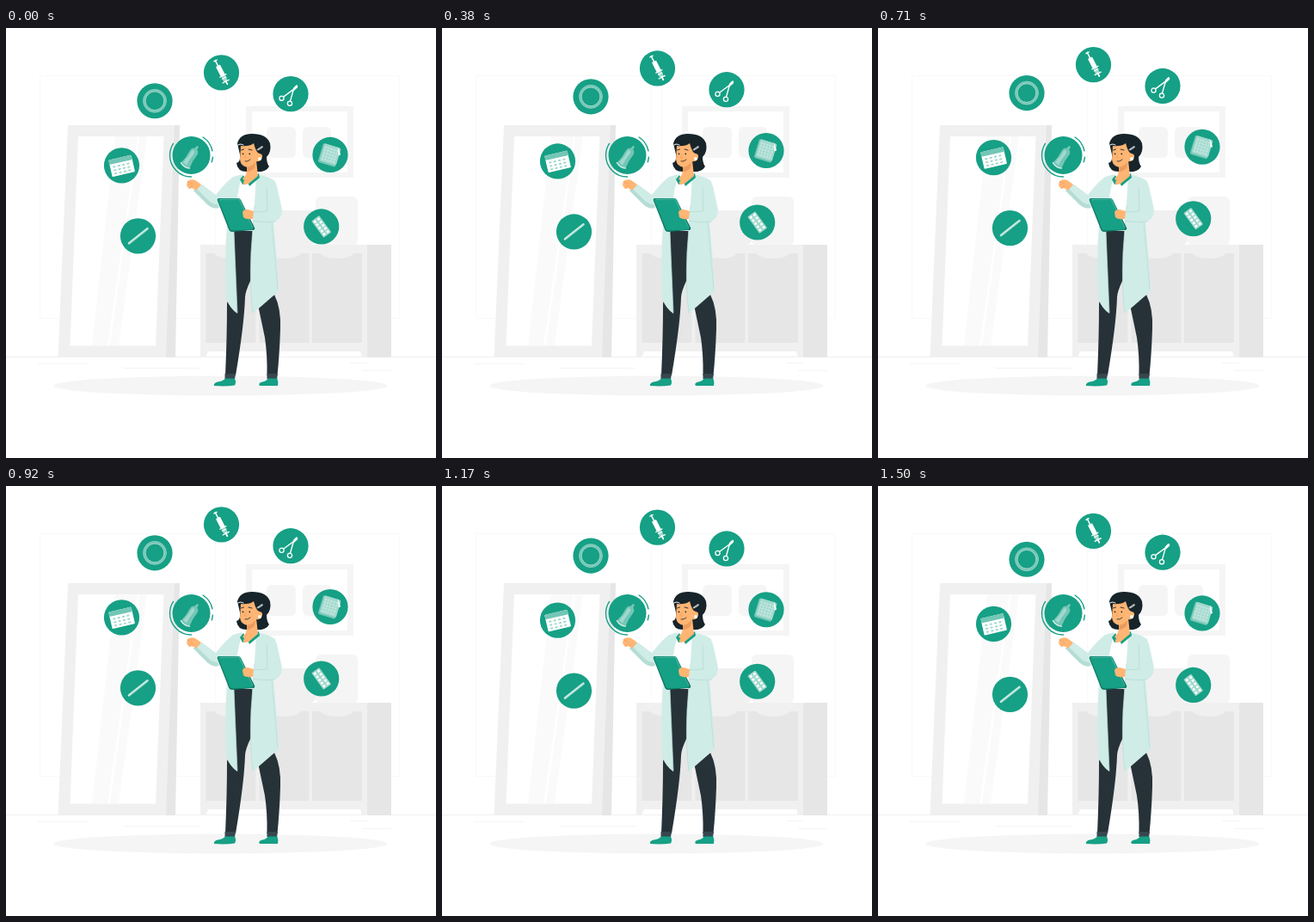
These frames come from a looping animation (500 by 500 pixels, 1540 ms). An HTML page with a canvas:

```html
<!DOCTYPE html>
<html lang="en">
<head>
<meta charset="utf-8">
<title>Floating icons</title>
<style>
  html, body { margin: 0; width: 100%; height: 100%; overflow: hidden; background: #fff; }
  canvas { display: block; width: 500px; height: 500px; }
</style>
</head>
<body>
<canvas id="stage" width="500" height="500"></canvas>
<script>
const ctx = document.getElementById('stage').getContext('2d');
const LOOP = 1540, RISE = 10, LEAD = LOOP / 37;
const GREEN = '#16a085', MINT = '#d0ece7', PALE = '#a2d9ce', SHADE = '#b5ddd5';
const DARK = '#263238', HAIR = '#17242a', SKIN = '#ffb573';

const fill = (d, color) => { ctx.fillStyle = color; ctx.fill(new Path2D(d)); };
const line = (d, color, width = 1) => {
  ctx.strokeStyle = color;
  ctx.lineWidth = width;
  ctx.stroke(new Path2D(d));
};
const box = (x, y, w, h, color, r = 0) => {
  ctx.fillStyle = color;
  ctx.beginPath();
  ctx.roundRect(x, y, w, h, r);
  ctx.fill();
};
const disc = (x, y, r, color) => {
  ctx.fillStyle = color;
  ctx.beginPath();
  ctx.arc(x, y, r, 0, Math.PI * 2);
  ctx.fill();
};
const arc = (x, y, r, from, to, color, width) => {
  ctx.strokeStyle = color;
  ctx.lineWidth = width;
  ctx.beginPath();
  ctx.arc(x, y, r, from * Math.PI / 180, to * Math.PI / 180);
  ctx.stroke();
};
const placed = (x, y, degrees, draw) => {
  ctx.save();
  ctx.translate(x, y);
  ctx.rotate(degrees * Math.PI / 180);
  draw();
  ctx.restore();
};

function drawRoom() {
  line('M39.5 55.5H243.5V337.5H39.5ZM255.5 55.5H457.5V337.5H255.5Z', '#f9f9f9');
  line('M0 382.5H500', '#f0f0f0');
  line('M37 390.5H96M136 395.5H225M400 389.5H420M414 398.5H448', '#f5f5f5');

  fill('M279 91H404V174H279ZM286 97V168H397V97Z', '#f5f5f5');
  box(303, 115, 34, 36, '#f5f5f5', 6);
  box(345, 115, 33, 36, '#f5f5f5', 6);

  box(360, 196, 49, 57, '#f5f5f5', 6);
  box(303, 212, 57, 40, '#f0f0f0', 6);
  fill('M226 252H420V383H414L412 376H235L232 383H226Z', '#f0f0f0');
  box(420, 252, 28, 131, '#e6e6e6');
  for (const x of [232.5, 294.5, 356]) {
    box(x, 262, 58, 104, '#e6e6e6');
    fill(`M${x + 9} 262H${x + 49}Q${x + 43} 268 ${x + 29} 268Q${x + 15} 268 ${x + 9} 262Z`, '#f0f0f0');
  }

  fill('M194 113H202L197 383H185Z', '#e6e6e6');
  fill('M72 113H196L186 383H60.5Z', '#f0f0f0');
  fill('M84 126H183.5L174 369.5H74.5Z', '#fff');
  fill('M127 126H153L118 369H100ZM155 126H164L131 369H121Z', '#fafafa');

  ctx.fillStyle = '#f5f5f5';
  ctx.beginPath();
  ctx.ellipse(249.5, 416, 194, 11.5, 0, 0, Math.PI * 2);
  ctx.fill();
}

function drawLegs() {
  fill('M265 234H287L285 292Q278 307 278 313Q277 345 267 404H255Q257 360 257 320L266 300Z', DARK);
  fill('M293 322L312 310Q320 326 319 350Q318 380 315.5 404H303.5Q304 380 301 360Z', DARK);
  fill('M254.5 402H267L266 408H254.5ZM303.5 402H316L315 408H303.5Z', '#37474f');
  fill('M255 407.5H266Q268 412 266 415.5Q255 417 242 416Q241 413 246 411.5Q252 411 255 407.5Z', GREEN);
  fill('M304.5 407.5H315.5Q317 412 316 416H295Q292.500 413 298 411.5Q303 410.500 304.5 407.5Z', GREEN);
}

function drawHead() {
  fill('M269 134Q272 123 286 123Q303 123 307 134Q309 144 303 150Q303 157 306 161Q302 168 292 167H280Q269 167 268 157Q273 156 272 147Z', HAIR);
  fill('M280 158L291 154L293 172L281 182L275 175Q280 171 280 166Z', SKIN);
  fill('M273 137Q283 138 288 134Q291 146 295 146Q300 147 297 153Q294 156 291 155Q288 162 281 162Q273 161 272 153Z', SKIN);
  fill('M280 162Q286 161 290 156L289 163Q285 167 280 167Z', '#ed9c5d');
  line('M270 136Q272 134 276 136', '#fff', 1);
  line('M273.500 142L276.500 141M282 141L286 142', HAIR, .9);
  disc(275.5, 146.3, .9, HAIR);
  disc(283.3, 146.3, .9, HAIR);
  line('M278.500 147L277.500 151H279.500', '#ed9c5d', .7);
  line('M278 155Q281 156 284 153', HAIR, .8);
  line('M292 141.500L297 138Q299 137 298 139L293 142', '#fff', .9);
  disc(295, 152, 2, '#fff');
}

function drawBody() {
  fill('M270 175L281 172L291 176L288 236H266Z', '#fff');
  // left sleeve and panel
  fill('M264 173Q255 180 244 194L228 182Q222 184 218 189L234 205Q241 211 248 209L266 195Z', MINT);
  fill('M228 182Q222 184 218 189L234 205Q241 211 247 209L246 205Q240 205 235 200L222 187Z', SHADE);
  fill('M264 173L275 170Q270 186 268 205L265 237L269 332Q261 327 256 315Q254 270 257 230L260 200Z', MINT);
  // right panel
  fill('M291 170Q304 172 313 178L311 225Q315 265 317 306L287 332Q283 305 285 260L289 205Z', MINT);
  line('M289 207L285 260Q283 303 287 331M265 236L269 331M309 226L316 304', SHADE, .7);
  fill('M276 171L280 180L275 182L272 176Z', GREEN);
  fill('M294 169L295 174L283 184L281 179Z', GREEN);
  disc(278, 180, 2.2, SKIN);
}

function drawArms() {
  fill('M227 182L220 177Q215 175 211 178L210 183L213 187Q217 185 221 189Z', SKIN);
  line('M211 179L216 181M213 187L217 183', '#ed9c5d', .6);
  fill('M248 198H270Q272 198 273 200L289 232Q290 235 287 235L263 237Q260 237 259 234L246 201Q245 198 248 198Z', '#0d7360');
  fill('M249 198.500H270Q272 198.500 273 200L287 232Q288 234 285 234.500L264 235.500Q261 236 260 233L247 201Q246 198.500 249 198.500Z', GREEN);
  line('M249 199.500L271 199L287 232', '#73c6b6', .6);
  fill('M306 174Q313 176 315 184L321 211Q321 221 313 225Q304 227 287 224L287 214L304 213L302 189Z', MINT);
  line('M303 185L304 213L287 214M287 224Q304 227 313 225', SHADE, .8);
  fill('M288 213L281 211Q276 211 275 214L276 220Q279 223 287 222Z', SKIN);
}

function drawPicked() {
  disc(215.5, 148, 22, GREEN);
  arc(215.5, 148, 25, 90, 213, GREEN, 1.4);
  arc(215.5, 148, 25, -57, -12, GREEN, 1.4);
  arc(215.5, 148, 25, 5, 18, GREEN, 1.4);
  placed(215.5, 149, 33, () => {
    fill('M-6 13Q-4 5 -5 -4Q-5 -9 -1.500 -10Q-2 -14 0 -14Q2 -14 1.500 -10Q5 -9 5 -4Q4 5 6 13Q0 16 -6 13Z', '#73c6b6');
    fill('M-4 11Q-2 2 -3 -6Q0 -9 1 -4Q0 4 1 12Z', PALE);
    line('M-6 13Q0 16 6 13', MINT, 1.4);
  });
}

function ringIcon() {
  arc(0, 0, 12, 0, 360, '#73c6b6', 3.2);
  arc(0, 0, 11, 0, 360, PALE, .8);
  arc(0, 0, 13.5, 0, 360, PALE, .6);
}
function syringeIcon() {
  placed(0, 0, -27, () => {
    line('M0 -16V-9', '#fff', 1.5);
    line('M-2 -15.500H2', '#fff', 1.2);
    box(-2.8, -9, 5.6, 13, '#fff', 1);
    box(-2.5, 4, 5, 7, PALE);
    line('M-4 4H4M-2.500 7H2.500M-4 11.500H4', '#fff', 1.3);
    line('M0 11V15', '#fff', 1.8);
  });
}
function scissorsIcon() {
  arc(-10.5, 5, 2.6, 0, 360, '#fff', 1.3);
  arc(-1, 11, 2.6, 0, 360, '#fff', 1.3);
  line('M-8.500 3.500L3 -5L7 -9.500M-.500 8.500L3 -4L7.500 -8', '#fff', 1.4);
  line('M4 -6L7 -9', '#fff', 2.4);
}
function padIcon() {
  placed(-.5, 0, 17, () => {
    box(-11, -11, 21, 23, '#73c6b6', 2);
    box(-9.5, -11, 20, 21, PALE, 2);
    for (let i = -7; i <= 7; i += 3.5) line(`M${i} -8V8M-8 ${i}H8`, MINT, .6);
    fill('M6 -12L12 -4L10 -2Z', '#fff');
  });
}
function blisterIcon() {
  placed(0, 0, -36, () => {
    box(-5.5, -12, 11, 24, PALE, 1);
    for (let y = -9; y <= 9; y += 4.5) {
      disc(-2.6, y, 1.6, '#fff');
      disc(2.6, y, 1.6, '#fff');
    }
  });
}
function calendarIcon() {
  placed(0, 0, -13, () => {
    box(-13.5, -9.5, 27, 20, '#fff', 1);
    box(-13.5, -9.5, 27, 5.5, '#73c6b6', 1);
    for (let y = -1.5; y <= 7; y += 4)
      for (let x = -10.5; x <= 9; x += 5.5) box(x, y, 3.4, 2, PALE, 1);
  });
}
function stickIcon() {
  line('M-10.500 8.500L11 -8.500', PALE, 2.8);
  line('M-11 8.500L11 -9', '#fff', .8);
}

// Resting centres of the floating discs
const floaters = [
  [173, 85.3, ringIcon], [250.5, 52.4, syringeIcon], [331, 77.2, scissorsIcon],
  [377, 148, padIcon], [366.7, 231.5, blisterIcon], [134.5, 160.4, calendarIcon],
  [153.5, 242.4, stickIcon]
];

function draw(time) {
  const phase = ((time + LEAD) % LOOP) / LOOP;
  const lift = RISE * (1 - Math.abs(1 - 2 * phase));
  ctx.fillStyle = '#fff';
  ctx.fillRect(0, 0, 500, 500);
  ctx.lineCap = 'butt';
  drawRoom();
  ctx.lineCap = ctx.lineJoin = 'round';
  drawLegs();
  drawBody();
  drawHead();
  drawArms();
  drawPicked();
  for (const [x, y, icon] of floaters) {
    placed(x, y - lift, 0, () => {
      disc(0, 0, 20.6, GREEN);
      icon();
    });
  }
}

const start = performance.now();
function tick() {
  draw(performance.now() - start);
  requestAnimationFrame(tick);
}
tick();
</script>
</body>
</html>
```
